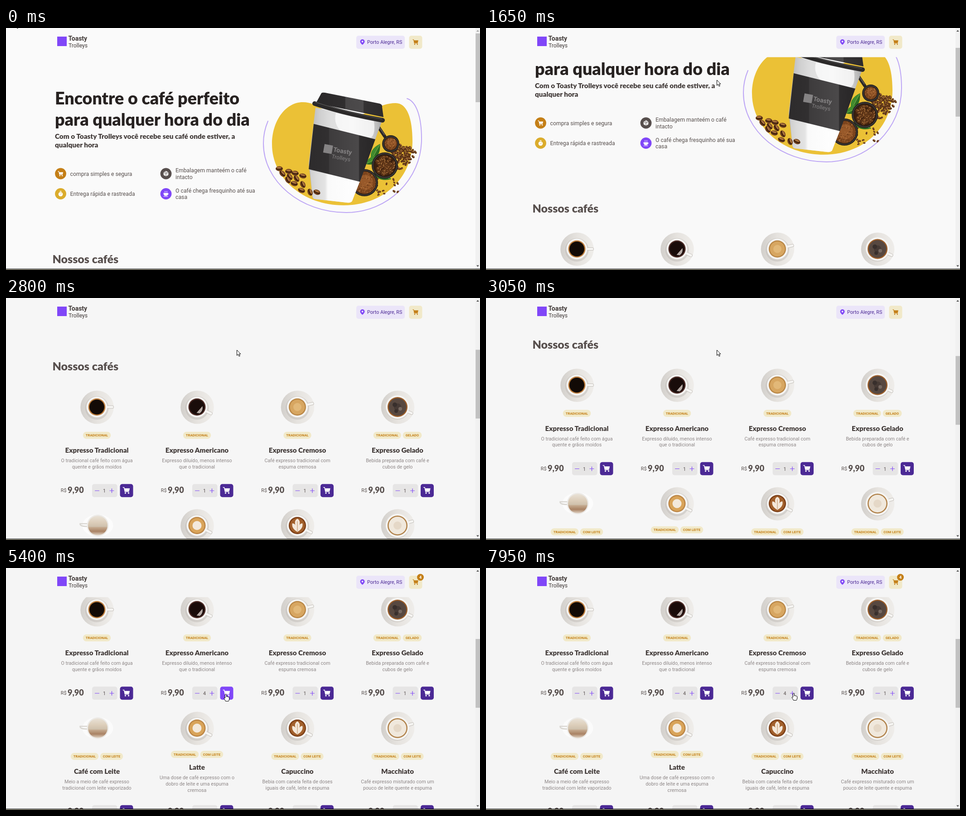
Write an HTML page that moves like this. It is 1046 by 535 pixels and loops after 8000 ms.

```html
<!DOCTYPE html>
<html lang="pt-BR">
<head>
<meta charset="utf-8">
<title>Nossos cafés</title>
<style>
html, body { margin: 0; width: 100%; height: 100%; overflow: hidden; }
svg { display: block; width: 1046px; height: 535px; }
text { font: 12.25px Roboto, sans-serif; fill: #574f4d; }
.hero { font: 900 37.6px Lato, sans-serif; fill: #272221; }
.lead { font: 900 15.3px Lato, sans-serif; fill: #403937; }
.section { font: 900 25px Lato, sans-serif; }
.title { font: 900 15.2px Lato, sans-serif; fill: #403937; text-anchor: middle; }
.desc { font-size: 10.75px; fill: #8d8686; text-anchor: middle; }
.tag { font-size: 7.7px; font-weight: 700; fill: #c47f17; text-anchor: middle; }
.small { font-size: 10.75px; }
.count { font-size: 10.75px; text-anchor: middle; }
.price { font: 900 18px Lato, sans-serif; }
.place { font-size: 10.75px; fill: #4b2995; }
.badge { font-size: 9px; font-weight: 700; fill: #fff; text-anchor: middle; }
.brand { font-size: 14px; font-weight: 700; fill: #403937; }
.brand2 { font-size: 12.2px; fill: #403937; }
.printed text { fill: #858384; }
</style>
</head>
<body>
<svg id="stage" viewBox="0 0 1046 535"></svg>
<script>
const PURPLE = '#8047f8', DARK_PURPLE = '#4b2995', GOLD = '#c47f17', CREAM = '#f1e9c9';
const ROW_STEP = 262, COLUMNS = [200.5, 421.5, 643, 864];

let seed = 11;
const random = () => (seed = seed * 16807 % 2147483647) / 2147483647;

const text = (x, y, str, cls = '') => `<text x="${x}" y="${y}" class="${cls}">${str}</text>`;
const rect = (x, y, w, h, fill, r = 0, extra = '') =>
  `<rect x="${x}" y="${y}" width="${w}" height="${h}" rx="${r}" fill="${fill}" ${extra}/>`;
const circle = (x, y, r, fill, extra = '') => `<circle cx="${x}" cy="${y}" r="${r}" fill="${fill}" ${extra}/>`;
const path = (d, fill, extra = '') => `<path d="${d}" fill="${fill}" ${extra}/>`;
const line = (d, color, width) => path(d, 'none', `stroke="${color}" stroke-width="${width}" stroke-linecap="round"`);
const at = (x, y, body, more = '') => `<g transform="translate(${x} ${y}) ${more}">${body}</g>`;

const cart = (x, y, size, color) => at(x, y,
  line('M-7.5 -6.5h2.3l2 9.5h8.5', color, 1.4) + path('M-5 -4.5H7.5L6 2H-3.5z', color) +
  circle(-2.2, 6, 1.6, color) + circle(4.8, 6, 1.6, color), `scale(${size / 16})`);

const bean = (x, y, r, angle) => at(x, y,
  `<ellipse rx="${r}" ry="${r * .68}" fill="#6b3d1b"/>` +
  `<ellipse cx="${-r * .1}" cy="${-r * .25}" rx="${r * .65}" ry="${r * .25}" fill="#a8713d"/>` +
  line(`M${-r * .8} 0Q0 ${r * .35} ${r * .8} 0`, '#2c1609', r * .2), `rotate(${angle})`);

function scatter(cx, cy, rx, ry, count, size) {
  let out = '';
  for (let i = 0; i < count; i++) {
    const a = random() * 2 * Math.PI, d = Math.sqrt(random());
    out += bean(cx + rx * d * Math.cos(a), cy + ry * d * Math.sin(a), size * (.8 + .4 * random()), random() * 180);
  }
  return out;
}

const leaf = (x, y, angle) => at(x, y,
  path('M-20 0Q-4 -17 20 0Q-4 15 -20 0z', '#2c6d22') + path('M-20 0Q-4 -17 20 0z', '#3f8a2d') +
  line('M-17 0H17', '#8fb95a', .8), `rotate(${angle})`);

const bowl = (x, y, r, fill) => circle(x, y, r, '#25211f') + circle(x, y, r - 2, '#4a4441') +
  circle(x, y, r - 3.5, '#1d1917') + circle(x, y, r - 5, fill);

// Ground coffee: a lit mound with grains.
function powder(x, y, r) {
  let out = circle(x, y, r, '#7d451d') + circle(x + 1, y - 1, r * .7, '#98592a');
  for (let i = 0; i < r * 5; i++) {
    const a = random() * 2 * Math.PI, d = r * Math.sqrt(random());
    out += circle(x + d * Math.cos(a), y + d * Math.sin(a), .8, i % 2 ? '#5c3012' : '#bb7d45');
  }
  return out;
}

function heroArt() {
  const spill = [[603, 311], [610, 322], [624, 317], [626, 329], [638, 321], [641, 333], [655, 327],
    [622, 336], [636, 344], [655, 346], [652, 359], [671, 363], [686, 363]];
  return path('M587 257C587 205 617 164 655 164C690 164 700 190 740 195C790 205 815 166 860 166C885 166 897 200 897 250C897 330 835 392 745 392C655 392 587 332 587 257z', '#ebc136') +
    line('M578 206C572 220 568 238 568 255C568 339 650 408 751 408C842 408 917 335 917 245C917 200 907 163 885 156', '#bda6f5', 2) +
    scatter(876, 275, 31, 18, 40, 3.4) + scatter(872, 288, 22, 24, 70, 3.8) + scatter(838, 352, 30, 26, 16, 3) +
    line('M836 240L822 219', '#2b2725', 7) + line('M835 236L825 221', '#6b6562', 1.5) +
    bowl(849, 256, 19, '#6f3d19') + powder(849.5, 255, 13) +
    leaf(816, 274, -62) + leaf(812, 292, -25) + leaf(831, 328, 18) +
    bowl(836, 304, 29, '#3b200f') + scatter(836, 304, 20, 20, 75, 4) +
    bowl(791, 342, 30, '#6f3d19') + powder(792, 342, 24) +
    path('M683 176L829 208L764 382Q762 387 752 386L681 378Q676 377 676 370L668 300z', 'url(#paper)') +
    path('M728 188L812 206Q816 235 805 243L738 227Q722 210 728 188z', '#fff', 'opacity=".7"') +
    path('M671 314L781 339L764 382Q762 387 752 386L681 378Q677 377 676 370z', 'url(#base)') +
    path('M679 212L815 246L781 340L668 312z', 'url(#sleeve)') +
    path('M696 144Q698 142 704 143L824 167Q831 169 830 175L833 197L684 166z', 'url(#lid)') +
    line('M681 167Q750 190 831 204', '#2b2929', 10) + line('M683 164Q750 186 829 201', '#515050', 1.5) +
    `<g class="printed">${at(710, 269, rect(-9, -11, 19, 19, '#858384') +
      text(12, 2, 'Toasty', 'brand') + text(11, 17, 'Trolleys', 'brand2'), 'rotate(10)')}</g>` +
    spill.map(([x, y], i) => bean(x, y, 8, i * 47 % 90)).join('');
}

function feature(x, y, color, lines, icon) {
  const first = lines.length > 1 ? y - 3 : y + 4.5;
  return circle(x, y, 12.4, color) + at(x, y, icon) +
    lines.map((s, i) => text(x + 21, first + i * 14.5, s)).join('');
}

function hero() {
  const box = path('M0 -6L5.3 -3V3L0 6L-5.3 3V-3z', '#fff') + line('M-5 -3L0 0L5 -3M0 0V5.5M-2.5 -4.5L2.5 -1.5', '#574f4d', 1);
  const timer = circle(0, 1, 4.8, '#fff') + line('M-1.5 -5.5h3', '#fff', 1.4) + line('M0 1l2 -2', '#dbac2c', 1);
  const mug = path('M-5.5 -2H4.5Q5 3 1.5 4.5H-2.5Q-5.5 3 -5.5 -2z', '#fff') +
    line('M4.5 -1Q7 0 4 2M-5 6H4M-2.5 -5.5v1.5M0 -5.5v1.5M2.5 -5.5v1.5', '#fff', 1);
  return text(108, 168.5, 'Encontre o café perfeito', 'hero') +
    text(108, 216, 'para qualquer hora do dia', 'hero') +
    text(108, 244.5, 'Com o Toasty Trolleys você recebe seu café onde estiver, a', 'lead') +
    text(108, 264.3, 'qualquer hora', 'lead') +
    feature(120.5, 322, GOLD, ['compra simples e segura'], cart(0, 0, 12, '#fff')) +
    feature(120.5, 366.5, '#dbac2c', ['Entrega rápida e rastreada'], timer) +
    feature(353, 322, '#574f4d', ['Embalagem manteém o café', 'intacto'], box) +
    feature(353, 366.5, PURPLE, ['O café chega fresquinho até sua', 'casa'], mug) +
    heroArt() + text(102.5, 519.5, 'Nossos cafés', 'section');
}

// Each drink: name, description lines, extra tag, handle angle, rim, coffee, foam radius and colour.
const drinks = [
  ['Expresso Tradicional', ['O tradicional café feito com água', 'quente e grãos moídos'], '', 0, '#bd7c3b', '#120a06'],
  ['Expresso Americano', ['Expresso diluído, menos intenso', 'que o tradicional'], '', 25, '#4b2a25', '#190c0a'],
  ['Expresso Cremoso', ['Café expresso tradicional com', 'espuma cremosa'], '', -13, '#b98645', '#d7a661', 9, '#e2b878'],
  ['Expresso Gelado', ['Bebida preparada com café e', 'cubos de gelo'], 'GELADO', 24, '#9a5c28', '#574840', 8, '#463a35'],
  ['Café com Leite', ['Meio a meio de café expresso', 'tradicional com leite vaporizado'], 'COM LEITE'],
  ['Latte', ['Uma dose de café expresso com o', 'dobro de leite e uma espuma', 'cremosa'], 'COM LEITE', 27, '#bb8444', '#d9a45a', 10, '#f3e9dc'],
  ['Capuccino', ['Bebia com canela feita de doses', 'iguais de café, leite e espuma'], 'COM LEITE', 27, '#7a3c14', '#a2602c', 0],
  ['Macchiato', ['Café expresso misturado com um', 'pouco de leite quente e espuma'], 'COM LEITE', -16, '#b08149', '#f0e8dc', 9, '#e5d8c7']
];

function cup(x, y, index, angle, rim, coffee, foam, foamColor) {
  if (index === 4) {
    return at(x + 2, y, `<ellipse rx="34" ry="24" fill="#fff" opacity=".65"/>` +
      line('M-23 -4H-39Q-40 2 -23 2', '#d9d6d1', 2.5) + circle(0, 0, 24, '#eceae7') + circle(0, 0, 21.5, 'url(#layers)'));
  }
  const r = index === 3 || index === 7 ? 21 : 18;
  let body = circle(.5, .5, 36.8, 'url(#saucer)') + circle(0, 2, 26, '#bbb7b2', 'opacity=".45"') +
    `<g transform="rotate(${angle})">${line('M22 0H34', '#c4c0bb', 7)}${line('M22 0H34', '#f6f5f3', 5)}</g>` +
    circle(0, 0, r + 5, '#f5f4f2') + circle(0, 0, r + 1, rim) + circle(0, 0, r - 1.5, coffee);
  if (foam) body += circle(0, 0, foam, foamColor);
  if (index === 1) body += path('M-1 13L12 -2Q14 8 6 14z', '#b6aaa5');
  if (index === 3) body += circle(-6, -5, 5, '#382f2c') + circle(6, 4, 4, '#786a62') + circle(-3, 9, 4, '#382f2c');
  if (index === 6) body += path('M0 14Q-14 6 -11 -5Q-5 -4 -4 0Q-8 -11 0 -15Q8 -11 4 0Q5 -4 11 -5Q14 6 0 14z', '#f4e8da') + line('M0 12V-9', '#b98556', 1);
  return at(x, y, body);
}

function tags(x, y, names) {
  const widths = { TRADICIONAL: 61.5, GELADO: 42, 'COM LEITE': 50.5 };
  let left = x - (names.reduce((sum, n) => sum + widths[n] + 3.5, -3.5)) / 2;
  return names.map(n => {
    const w = widths[n], out = rect(left, y - 7.7, w, 15.4, CREAM, 7.7) + text(left + w / 2, y + 2.8, n, 'tag');
    left += w + 3.5;
    return out;
  }).join('');
}

function card([name, lines, extra, ...look], index) {
  const x = COLUMNS[index % 4], y = 600.5 + ROW_STEP * (index > 3);
  const lift = lines.length > 2 ? 4.5 : 0, mid = y + 184.7;
  return cup(x, y, index, ...look) +
    tags(x, y + 62.5 - lift, extra ? ['TRADICIONAL', extra] : ['TRADICIONAL']) +
    text(x, y + 101 - 2 * lift, name, 'title') +
    lines.map((s, i) => text(x, y + 122 - 2 * lift + i * 13.8, s, 'desc')).join('') +
    text(x - 79.7, mid + 3.3, 'R$', 'small') + text(x - 64.5, mid + 5.5, '9,90', 'price') +
    rect(x - 10.5, mid - 14.5, 55.5, 29, '#e6e5e5', 5) +
    line(`M${x - 4} ${mid + .3}h9M${x + 28.5} ${mid + .3}h9m-4.5 -4.5v9`, PURPLE, 1.2) +
    `<text id="count${index}" class="count" x="${x + 16.5}" y="${mid + 4.3}">1</text>` +
    rect(x + 51, mid - 14.5, 29, 29, DARK_PURPLE, 5, `id="buy${index}"`) + cart(x + 65.2, mid - .5, 16, '#fff');
}

const header = rect(0, 0, 1036, 64.5, 'var(--bg)') + rect(113, 19, 21, 21, PURPLE) +
  text(137.5, 28, 'Toasty', 'brand') + text(138, 43, 'Trolleys', 'brand2') +
  rect(773, 17, 107, 29, '#ebe5f9', 5) +
  path('M786.5 37.3Q781.5 33 781.5 30A5 5 0 0 1 791.5 30Q791.5 33 786.5 37.3z', PURPLE) + circle(786.5, 30, 1.9, '#ebe5f9') +
  text(797, 34.8, 'Porto Alegre, RS', 'place') +
  rect(889.5, 17, 29, 29, CREAM, 5) + cart(903.8, 31, 13, GOLD) +
  `<g id="badge">${circle(914.5, 20.5, 7.5, GOLD)}${text(914.5, 23.8, '4', 'badge')}</g>`;

const scrollbar = rect(1036, 0, 10, 533, '#f1f1f1') + rect(1036.3, 12, 9.7, 152, '#c1c1c1', 0, 'id="thumb"') +
  path('M1038 8l3 -3.5l3 3.5z', '#505050', 'id="up"') + path('M1038 524.5l3 3.5l3 -3.5z', '#505050');

const outline = 'stroke="#000" stroke-width="1" stroke-linejoin="round"';
const cursors = path('M0 0V12L2.8 9.5L4.8 14L6.8 13.1L4.8 8.8H8.5z', '#fff', `id="arrow" ${outline}`) +
  path('M-1.5 9V1.2Q0 -.8 1.5 1.2V6Q3 4.8 4 6.3Q5.3 5.4 6.2 7Q7.5 6.5 7.7 8V11.5Q7.5 13.5 6 16H-.5Q-1.3 13.5 -4 10Q-4.3 8 -1.5 9z', '#fff', `id="hand" ${outline}`);

const gradient = (id, stops, vertical) =>
  `<linearGradient id="${id}" ${vertical ? 'x2="0" y2="1"' : ''}>` +
  stops.map(([o, c]) => `<stop offset="${o}" stop-color="${c}"/>`).join('') + '</linearGradient>';

const stage = document.getElementById('stage');
stage.innerHTML = '<defs>' +
  gradient('paper', [[0, '#b4b4b4'], [.15, '#cfcfcf'], [.3, '#dedede'], [.6, '#e8e8e8'], [.85, '#d2d2d2'], [1, '#ababab']]) +
  gradient('base', [[0, '#cfcfcf'], [.12, '#dadada'], [.3, '#e4e4e4'], [.36, '#fafafa'], [1, '#fff']]) +
  gradient('sleeve', [[0, '#2d2b2c'], [.3, '#312f30'], [.31, '#3d3b3c'], [.58, '#464445'], [.75, '#4b494a'], [.76, '#2f2d2e'], [1, '#282627']]) +
  gradient('lid', [[0, '#2a2829'], [.43, '#302e2f'], [.44, '#484647'], [.7, '#4d4b4c'], [.71, '#343233'], [1, '#2c2a2b']]) +
  gradient('saucer', [[0, '#d2cfcb'], [.5, '#e6e3df'], [1, '#efedea']]) +
  gradient('layers', [[0, '#e9e2d7'], [.35, '#dccdb9'], [.55, '#cfc1ad'], [.6, '#c4a98e'], [.8, '#a98264'], [1, '#e0d3c4']], true) +
  '</defs>' + rect(0, 0, 1046, 535, 'var(--bg)') +
  `<g id="page">${hero()}${drinks.map(card).join('')}</g>` + header + scrollbar +
  rect(0, 532.4, 1046, 1.7, '#000') + rect(0, 534.1, 1046, .9, '#f5efd0') + `<g id="cursor">${cursors}</g>`;

// Linear interpolation over keys of [time, ...values].
function track(keys, t) {
  const i = keys.findIndex(k => k[0] > t);
  if (i < 0) return keys.at(-1).slice(1);
  const [a, b] = [keys[i - 1], keys[i]], p = (t - a[0]) / (b[0] - a[0]);
  return a.slice(1).map((v, j) => v + (b[j + 1] - v) * p);
}

const scrollKeys = [[0, 0], [1300, 0], [1350, 1.5], [1500, 102], [1600, 102], [1650, 112], [1850, 204],
  [2150, 204], [2200, 209], [2300, 270], [2450, 306], [2650, 306], [2700, 312], [2800, 359.5], [2850, 359.5],
  [2950, 406], [3050, 408], [3150, 460], [3300, 508.5]];
const cursorKeys = [[0, 20, -13], [250, 330, 62], [550, 509.5, 115], [3450, 509.5, 115], [3500, 504, 135],
  [3650, 472, 225], [3850, 454, 276.5], [4850, 454, 276.5], [5200, 485, 278.5], [5700, 485, 278.5],
  [6550, 684, 277], [6950, 684, 277], [7050, 675, 276], [7200, 675, 276], [7250, 670, 276],
  [7800, 670, 276], [7900, 679, 276.5]];
const clicks = { 1: [4350, 4600, 4800], 2: [7700, 7850, 7950] };
const $ = id => document.getElementById(id);

function draw() {
  const t = Math.floor(performance.now() % 8000 / 50) * 50;
  const [scroll] = track(scrollKeys, t), [x, y] = track(cursorKeys, t);
  const shade = Math.round(250 - scroll / 100);
  stage.style.setProperty('--bg', `rgb(${shade},${shade},${shade})`);
  $('page').setAttribute('transform', `translate(0 ${-scroll})`);
  $('thumb').setAttribute('y', 12 + scroll * .285);
  $('up').setAttribute('fill', scroll > 2 ? '#505050' : '#a3a3a3');
  $('cursor').setAttribute('transform', `translate(${x} ${y})`);

  const inRow = y > 262 && y < 291;
  let pointing = false;
  COLUMNS.forEach((c, i) => {
    const overBuy = inRow && x > c + 51 && x < c + 80;
    const overStep = inRow && (Math.abs(x - c - 33) < 9 || Math.abs(x - c) < 7);
    pointing ||= overBuy || overStep;
    $('buy' + i).setAttribute('fill', overBuy ? PURPLE : DARK_PURPLE);
    $('count' + i).textContent = 1 + (clicks[i] || []).filter(time => t >= time).length;
  });
  $('hand').style.display = pointing ? '' : 'none';
  $('arrow').style.display = pointing ? 'none' : '';
  $('badge').style.display = t >= 5350 ? '' : 'none';
  requestAnimationFrame(draw);
}
draw();
</script>
</body>
</html>
```
